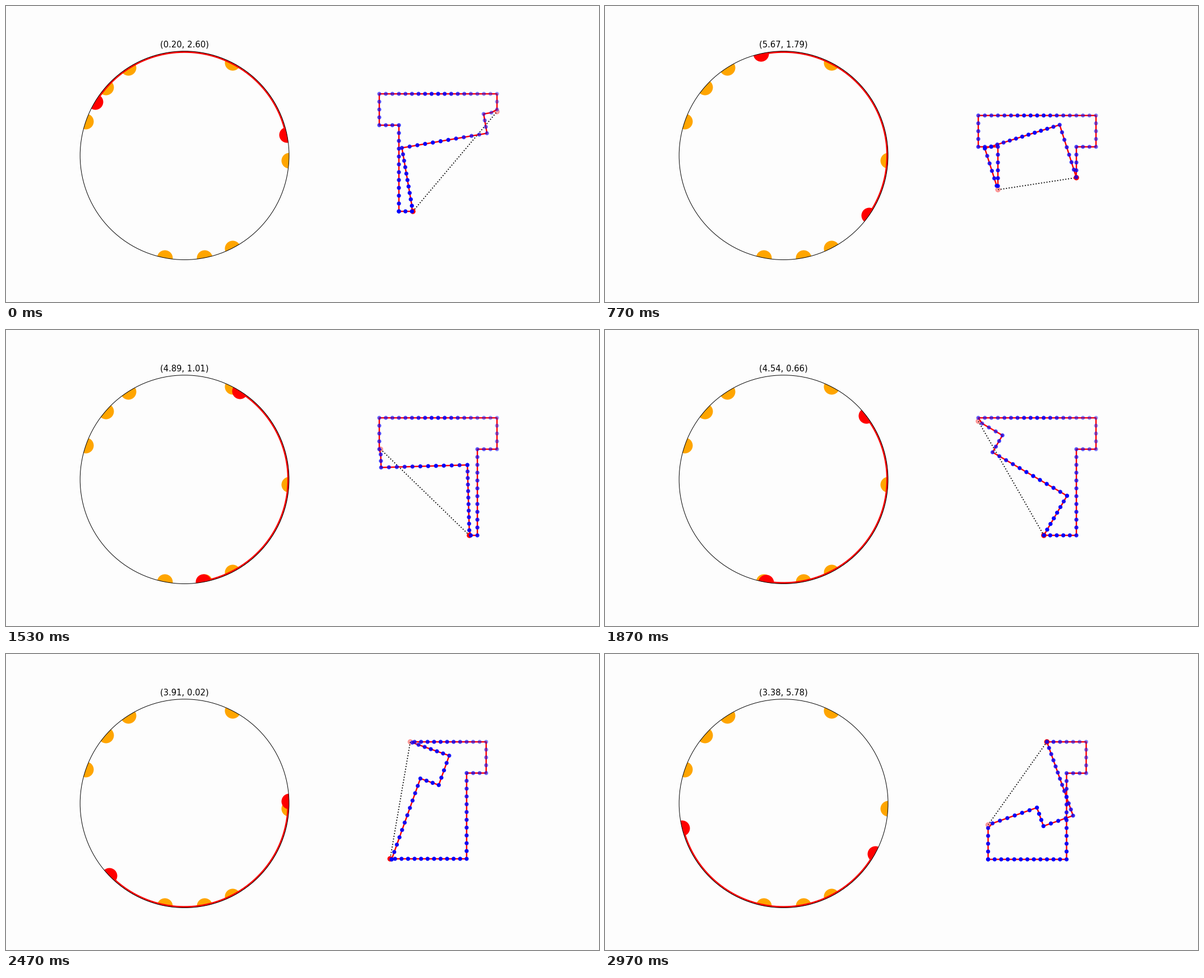
These frames come from a looping animation (1058 px wide and 529 px high, 3.01 s). A matplotlib script:

```python
import numpy as np
import matplotlib.pyplot as plt
from matplotlib.animation import FuncAnimation
from matplotlib.patches import Circle

W, H, DPI = 1058, 529, 64
PX = 72 / DPI              # points per pixel
PT = W / 12 / 72           # pixels per nominal point on a 12 inch wide page
TAU = 2 * np.pi
FRAMES, LOOP = 90, 3010
START, SPAN = 0.2, 2.4     # first angle and arc length of the fold
CX, CY, R = 318.6, 267.1, 186.4
MID, SIZE = np.array([771, 262]), 210

# T-shaped outline, counter-clockwise from its lower left corner
corners = np.array([(.5, 0), (2.5, 0), (2.5, 2.2), (3, 2.2),
                    (3, 3), (0, 3), (0, 2.2), (.5, 2.2)])
steps = [12, 11, 3, 4, 18, 4, 3, 11]
outline = np.vstack(
    [np.linspace(p, q, n, endpoint=False)
     for p, q, n in zip(corners, np.roll(corners, -1, axis=0), steps)]
    + [corners[:1]])
N = len(outline)


def on_circle(t):
    return np.column_stack([CX + R * np.cos(t), CY - R * np.sin(t)])


def on_outline(t):
    i, f = divmod(t % TAU * N / TAU, 1)
    i = int(i) % N
    return (1 - f) * outline[i] + f * outline[(i + 1) % N]


def fold(a, b):
    """Mirror the part of the outline between a and b in its chord."""
    p, q = on_outline(a), on_outline(b)
    u = (q - p) / np.linalg.norm(q - p)
    d = outline - p
    mirrored = p + 2 * np.outer(d @ u, u) - d
    inside = (np.arange(N) - a * N / TAU) % N < SPAN * N / TAU
    return np.where(inside[:, None], mirrored, outline), p, q


def fit(points):
    """Centre the points in the right half and scale them to SIZE."""
    lo, hi = points.min(axis=0), points.max(axis=0)
    scale = SIZE / (hi - lo).max()
    return MID + (points - (lo + hi) / 2) * scale * [1, -1]


def shade(points):
    u, v = ((points - MID) / (SIZE / 2)).T
    alpha = .68 + .2 * v - .1 * u - .1 * u**2 + .35 * np.exp(-(u / .45)**2)
    rgba = np.tile([0., 0., 1., 1.], (len(points), 1))
    rgba[:, 3] = np.clip(alpha, .3, 1)
    return rgba


fig = plt.figure(figsize=(W / DPI, H / DPI), dpi=DPI, facecolor='#fdfdfd')
ax = fig.add_axes([0, 0, 1, 1])
ax.set_xlim(0, W)
ax.set_ylim(H, 0)
ax.axis('off')


def dots(points, diameter, color, z, edge=0):
    return ax.scatter(*np.transpose(points), s=(diameter * PX)**2, c=color,
                      linewidths=edge * PX, zorder=z)


def line(color, width, z, style='-'):
    return ax.plot([], [], style, color=color, lw=width * PX, zorder=z)[0]


# left: parameter circle
ring = ax.add_patch(Circle((CX, CY), R, fill=False, ec='black',
                           lw=.8 * PT * PX, zorder=6))
marks = (np.cumsum([0] + steps[:-1]) - .5) * TAU / (N - 1)
corner_dots = dots(on_circle(marks), 28, 'orange', 2)
arc = line('red', 5 * PT, 3)
ends = dots(on_circle(np.zeros(2)), 28, 'red', 4)
for part in (corner_dots, arc, ends):
    part.set_clip_path(ring)
label = ax.text(CX, CY - R - 6 * PT, '', ha='center', va='baseline',
                fontsize=12 * PT * PX, family='DejaVu Sans')

# right: folded outline
chord = line('black', 1.5 * PT, 2, ':')
shape = line('red', 2 * PT, 3)
tips = dots(np.zeros((2, 2)), 40**.5 * PT, [(1, 0, 0, 1), (1, 0, 0, .3)],
            4, 1.5 * PT)
beads = dots(outline, 20**.5 * PT, 'blue', 5, 1.5 * PT)


def update(k):
    a = (START - np.pi * k / (FRAMES - 1)) % TAU
    b = (a + SPAN) % TAU
    label.set_text(f'({a:.2f}, {b:.2f})')
    arc.set_data(*on_circle(np.linspace(a, a + SPAN, 200)).T)
    ends.set_offsets(on_circle(np.array([a, b])))

    folded, p, q = fold(a, b)
    pts = fit(np.vstack([folded, p, q]))
    folded, pair = pts[:-2], pts[-2:]
    chord.set_data(*pair.T)
    shape.set_data(*folded.T)
    tips.set_offsets(pair if a < b else pair[::-1])
    beads.set_offsets(folded)
    beads.set_color(shade(folded))
    return arc, ends, label, chord, shape, tips, beads


anim = FuncAnimation(fig, update, frames=FRAMES, interval=LOOP / FRAMES,
                     repeat=True, repeat_delay=0)
plt.show()
```
